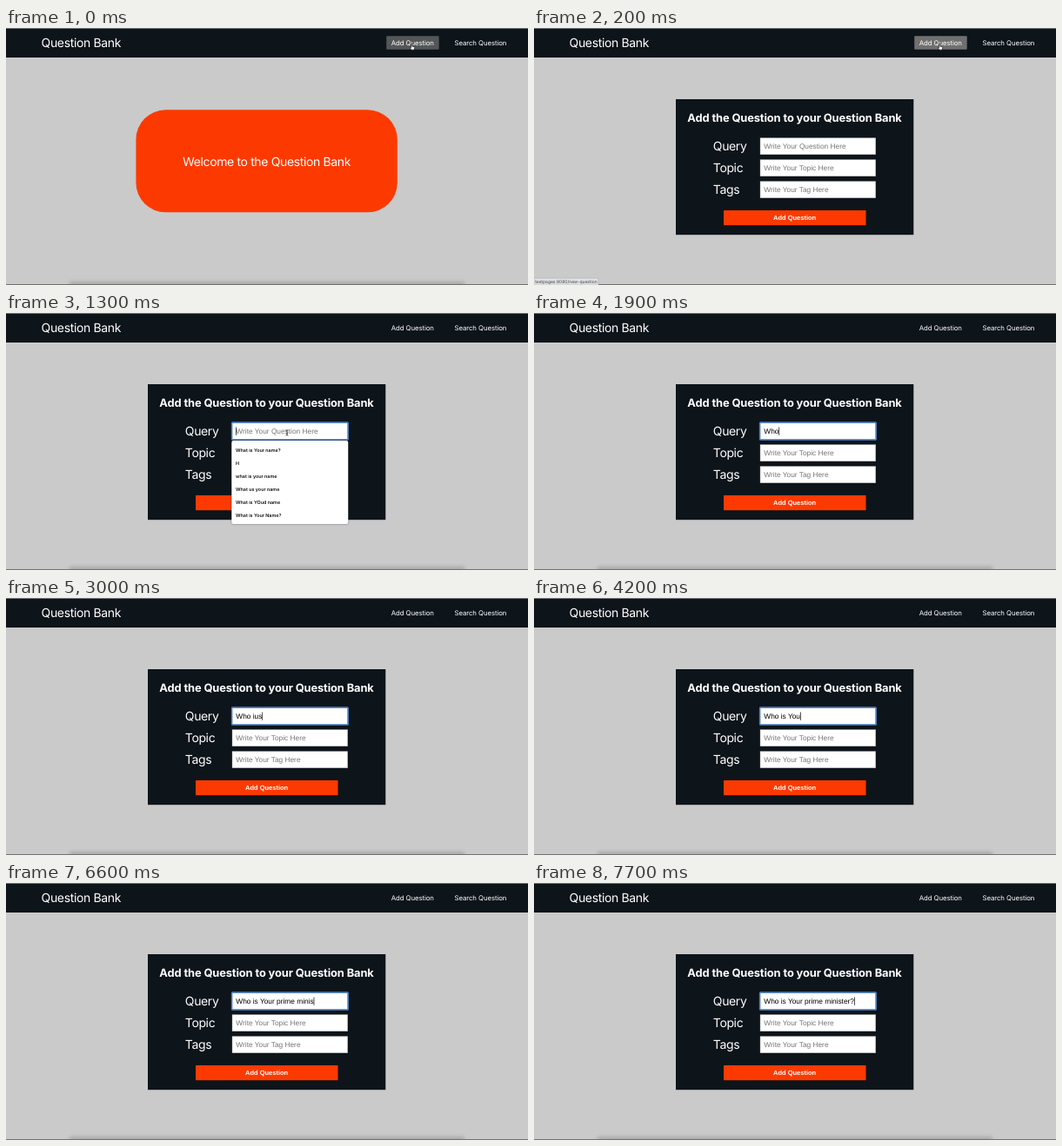
Animation, 600 px wide and 296 px high, one loop 8000 ms. Source, as an HTML page:

```html
<!DOCTYPE html>
<html lang="en">
<head>
<meta charset="utf-8">
<title>Question Bank</title>
<style>
  html, body { margin: 0; width: 100%; height: 100%; overflow: hidden; background: #cacaca; }
  svg { display: block; width: 100vw; height: 100vh; }
  text { font-family: Inter, sans-serif; fill: #fff; white-space: pre; text-rendering: geometricPrecision; }
  .big { font-size: 14px; letter-spacing: -.026em; }
  .nav { font-size: 7.8px; letter-spacing: -.01em; }
  .head { font-size: 12.9px; font-weight: 700; letter-spacing: -.01em; }
  .field { font: 8.33px "Liberation Sans", Arial, sans-serif; fill: #757575; }
  .typed { fill: #000; }
  .btn { font: bold 7.5px "Liberation Sans", Arial, sans-serif; }
  .item { font-size: 5.4px; font-weight: 600; fill: #111; }
  .status { font-size: 5px; fill: #444; }
</style>
</head>
<body>
<svg viewBox="0 0 600 296" preserveAspectRatio="none">
  <defs>
    <filter id="soft" x="-10%" y="-200%" width="120%" height="500%"><feGaussianBlur stdDeviation="2"/></filter>
    <filter id="drop" x="-10%" y="-10%" width="120%" height="120%"><feGaussianBlur stdDeviation="1.3"/></filter>
  </defs>
  <rect width="600" height="296" fill="#cacaca"/>
  <rect id="dock" x="73" y="292.3" width="454" height="6" fill="#000" opacity=".17" filter="url(#soft)"/>
  <rect y="295" width="600" height="1" fill="#707070"/>

  <rect width="600" height="34" fill="#0d141a"/>
  <rect width="600" height="1" fill="#6c7074"/>
  <rect id="hover" x="437.2" y="9.3" width="60.5" height="15.4" rx="1"/>
  <text class="big" x="40.6" y="22.4">Question Bank</text>
  <text class="nav" x="442.7" y="19.9">Add Question</text>
  <text class="nav" x="515.5" y="19.9">Search Question</text>

  <g id="welcome">
    <rect x="149.4" y="94.3" width="300.4" height="118" rx="34" fill="#fc3a00"/>
    <text class="big" x="299.5" y="159" text-anchor="middle">Welcome to the Question Bank</text>
  </g>

  <g id="form">
    <rect x="163" y="82" width="273.3" height="156.2" fill="#0d141a"/>
    <text class="head" x="299.5" y="108.1" text-anchor="middle">Add the Question to your Question Bank</text>
    <g id="rows"></g>
    <rect x="218" y="210" width="163.5" height="17.2" fill="#fc3a00"/>
    <text class="btn" x="299.6" y="221.2" text-anchor="middle">Add Question</text>
    <rect id="ring" x="259.6" y="126" width="133.6" height="20.1" rx=".8" fill="none" stroke="#4f86cd" stroke-width="1.5"/>
    <text class="field typed" id="typed" x="264.3" y="139"></text>
    <rect id="caret" y="131.5" width=".7" height="9.3" fill="#000"/>
    <g id="list"></g>
  </g>

  <g id="status">
    <path d="M0 288.2H72Q74 288.2 74 290.2V296H0Z" fill="#dfe2e5" stroke="#aaa" stroke-width=".5"/>
    <text class="status" x="1.2" y="293.8">testpages:8080/new-question</text>
  </g>

  <g id="cursor" stroke-linejoin="round">
    <path id="hand" d="M-1.2-3.2Q-.5-4 0-3.2V-.9L2.2-.4Q2.9 0 2.7 1L2 3.2H-1L-2.8.6Q-2.6-.2-1.2.5Z" fill="#fff" stroke="#111" stroke-width=".7"/>
    <path id="arrow" d="M-2-3.5V3L-.5 1.7L.5 3.9L1.5 3.5L.6 1.3H2.6Z" fill="#111" stroke="#fff" stroke-width=".6"/>
    <path id="beam" d="M-1.5-3.2Q0-3.2 0-2.4Q0-3.2 1.5-3.2M0-2.4V2.4M-1.5 3.2Q0 3.2 0 2.4Q0 3.2 1.5 3.2M-.9 1H.9" fill="none" stroke="#222" stroke-width=".7"/>
  </g>
</svg>
<script>
const LOOP = 8000, STEP = 100;
const $ = id => document.getElementById(id);
const show = (id, on) => { $(id).style.display = on ? '' : 'none'; };
const clamp = v => Math.min(1, Math.max(0, v));

$('rows').innerHTML = [['Query', 'Question'], ['Topic', 'Topic'], ['Tags', 'Tag']].map(([label, hint], i) => {
  const y = 126.6 + 25 * i;
  return `<text class="big" x="205.8" y="${y + 14.3}">${label}</text>
    <rect x="260" y="${y}" width="132.8" height="19.2" fill="#fff" stroke="#999" stroke-width=".4"/>
    <text class="field" x="264.3" y="${y + 12.4}" ${i ? '' : 'id="hint"'}>Write Your ${hint} Here</text>`;
}).join('');

const history = ['What is Your name?', 'H', 'what is your name', 'What us your name', 'What is YOud name', 'What is Your Name?'];

// Keystrokes: start of each burst in steps, then its keys ("<" deletes, "." waits one step)
const bursts = [[16, 'Who'], [21, ' '], [24, 'ius'], [31, '<<.s '], [40, 'You'], [44, 'r '], [49, 'p.ri'],
  [54, 'me'], [57, ' '], [60, 'mini'], [66, 's'], [68, 't'], [70, 'e'], [73, 'r'], [77, '?']];

function typedAt(t) {
  let s = '';
  for (const [start, keys] of bursts)
    [...keys].forEach((k, i) => {
      if ((start + i) * STEP > t || k === '.') return;
      s = k === '<' ? s.slice(0, -1) : s + k;
    });
  return s;
}

function drawList(prefix) {
  const items = history.filter(h => h.toLowerCase().startsWith(prefix.toLowerCase()));
  const h = items.length * 15 + 6;
  const box = `x="259.3" y="147" width="134" height="${h}" rx="2"`;
  $('list').innerHTML = `<rect ${box} fill="#000" opacity=".45" filter="url(#drop)"/><rect ${box} fill="#fff"/>` +
    items.map((s, i) => `<text class="item" x="264" y="${159.6 + 15 * i}">${s}</text>`).join('');
}

function drawCursor(t) {
  const p = clamp((t - 300) / 700), e = p * p * (3 - 2 * p);
  const x = 467 - 144 * e, y = 22 + 116 * e;
  const onLink = y < 25, onField = y > 126 && x < 393;
  $('cursor').setAttribute('transform', `translate(${x} ${y})`);
  show('cursor', t < 1600);
  show('hand', onLink);
  show('beam', onField);
  show('arrow', !onLink && !onField);
}

function draw(t) {
  const added = t >= 100, focus = t >= 1000, linked = added && t < 700;
  show('welcome', !added);
  show('form', added);
  show('status', linked);
  show('dock', !linked);

  const glow = t < 500 ? .72 + .28 * clamp(t / 200) : clamp((700 - t) / 200);
  $('hover').setAttribute('fill', `rgba(112,112,112,${glow})`);

  const s = typedAt(t);
  show('hint', !s);
  show('ring', focus);
  show('caret', focus);
  $('typed').textContent = s;
  $('caret').setAttribute('x', 264.3 + (s && added ? $('typed').getComputedTextLength() : 0));

  const open = t >= 1100 && t < 1800;
  show('list', open);
  if (open) drawList(s);
  drawCursor(t);
}

function tick() {
  draw(Math.floor(performance.now() % LOOP / STEP) * STEP);
  requestAnimationFrame(tick);
}
tick();
</script>
</body>
</html>
```
